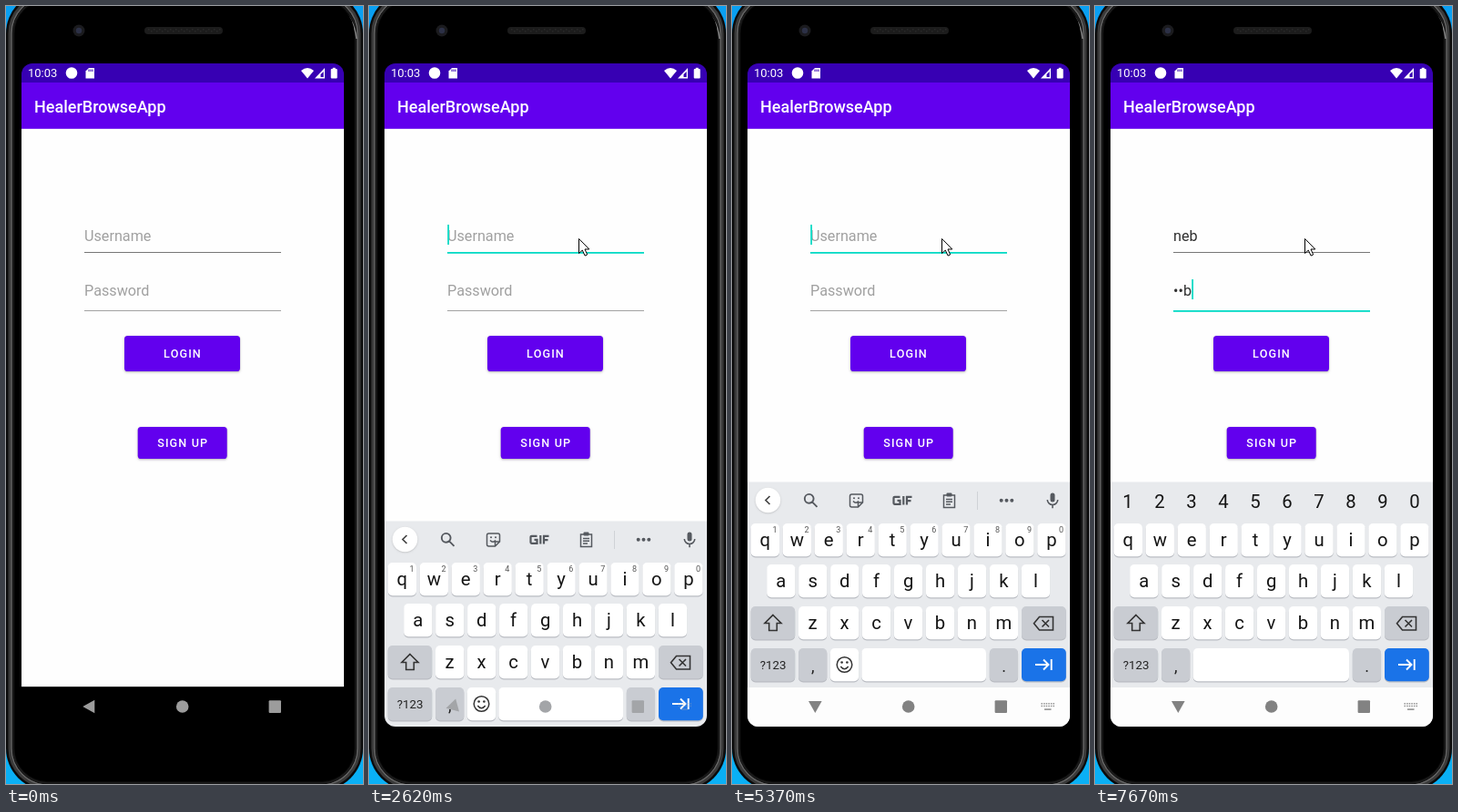
Animation, 392 px wide and 854 px high, one loop 8 s. Source, as an HTML page with a canvas:

```html
<!DOCTYPE html>
<html lang="en">
<head>
<meta charset="utf-8">
<title>Login screen</title>
<style>
html, body { margin: 0; width: 100%; height: 100%; overflow: hidden; background: #0aaef4; }
canvas { display: block; width: 392px; height: 854px; }
</style>
</head>
<body>
<canvas id="stage" width="392" height="854"></canvas>
<script>
const c = document.getElementById('stage').getContext('2d');
const LOOP = 8000;
const USER = 'neb';
const TEAL = '#03dac5', PURPLE = '#6200ee', ICON = '#55595f';
const FONT = 'Roboto, "Open Sans", sans-serif';

// Last entry whose time has passed.
const at = (list, t) => list.reduce((v, [time, value]) => (t >= time ? value : v), null);

const pointerPath = [[1140, [374, 249]], [1290, [276, 271]], [1440, [238, 271]], [1590, [230, 257]], [1740, [230, 255]]];
const caretBlink = [[0, 0], [2180, 1], [2890, 0], [3420, 1], [3950, 0], [4350, 1], [4960, 0], [5370, 1], [7250, 0], [7400, 1]];
const userLen = [[0, 0], [5910, 1], [6180, 2], [6450, 3]];
const markLen = [[0, 0], [6060, 1], [6300, 2], [6600, 3], [6850, 0]];
const passLen = [[0, 0], [7400, 1], [7550, 2], [7670, 3]];
const hints = [[6060, ['n', 'no', 'a']], [6300, ['ne', 'new', 'never']], [6600, ['neb', 'new', 'nebula']]];

function box(x, y, w, h, r, fill) {
  c.beginPath();
  c.roundRect(x, y, w, h, r);
  c.fillStyle = fill;
  c.fill();
}
function rect(x, y, w, h, fill) {
  c.fillStyle = fill;
  c.fillRect(x, y, w, h);
}
function disc(x, y, r, fill) {
  c.beginPath();
  c.arc(x, y, r, 0, 7);
  c.fillStyle = fill;
  c.fill();
}
function poly(pts, fill) {
  c.beginPath();
  pts.forEach(([x, y]) => c.lineTo(x, y));
  c.closePath();
  c.fillStyle = fill;
  c.fill();
}
function stroke(path, color, width = 1.6) {
  c.strokeStyle = color;
  c.lineWidth = width;
  c.stroke(new Path2D(path));
}
function text(s, x, y, size, fill, align = 'left', weight = 400, gap = 0) {
  c.font = `${weight} ${size}px ${FONT}`;
  c.letterSpacing = gap + 'px';
  c.textAlign = align;
  c.fillStyle = fill;
  c.fillText(s, x, y);
  c.letterSpacing = '0px';
}
function shifted(x, y, draw) {
  c.save();
  c.translate(x, y);
  draw();
  c.restore();
}

function frameLine(inset, color, width) {
  c.beginPath();
  c.roundRect(inset, inset - 16, 392 - 2 * inset, 877 - 2 * inset, 46 - inset);
  c.strokeStyle = color;
  c.lineWidth = width;
  c.stroke();
}

function phone() {
  const sky = c.createLinearGradient(0, 0, 0, 854);
  sky.addColorStop(0, '#0a9ff2');
  sky.addColorStop(1, '#0ab0f5');
  rect(0, 0, 392, 854, sky);
  box(0, -16, 392, 877, 46, '#0b0b0b');
  frameLine(4.5, '#3a3a3a', 4);
  frameLine(6, '#666', 1.3);
  frameLine(8, '#1c1c1c', 1.5);
  stroke('M358 -2 Q381 6 385 36', '#858585', 1.5);
  box(9.5, -6, 373, 857, 36, '#000');
  disc(80, 27, 6.5, '#1b1b1e');
  disc(80, 27, 3.2, '#2c3046');
  box(152, 23, 86, 8, 4, '#1c1c1c');
  for (let x = 156; x < 236; x += 3) rect(x, 25 + x % 2 * 2, 1.5, 1.5, '#292929');
}

function statusBar() {
  rect(17, 63, 354, 21.5, '#3700b3');
  text('10:03', 24, 78, 13, '#fff');
  disc(72, 73.5, 6.3, '#fff');
  poly([[91, 68], [97, 68], [97, 79.5], [87.5, 79.5], [87.5, 71.5]], '#fff');
  [90.5, 92.5, 94.5].forEach(x => rect(x, 69.5, 1, 2.5, '#3700b3'));
  c.beginPath();
  c.moveTo(331, 79.5);
  c.lineTo(324, 71);
  c.quadraticCurveTo(331, 65, 338, 71);
  c.fillStyle = '#fff';
  c.fill();
  poly([[350, 68], [350, 79.5], [339, 79.5]], '#fff');
  poly([[348.7, 72], [348.7, 78], [345.5, 78], [345.5, 75]], '#3700b3');
  box(356.7, 69, 7, 10.5, 1, '#fff');
  rect(358.7, 67.8, 3, 2, '#fff');
}

function button(label, x, y, w, h) {
  c.save();
  c.shadowColor = 'rgba(0,0,0,.3)';
  c.shadowBlur = 2.5;
  c.shadowOffsetY = 1;
  box(x, y, w, h, 3.6, PURPLE);
  c.restore();
  text(label, x + w / 2 + 0.5, Math.round(y + h / 2 + 4.6), 12.6, '#fff', 'center', 500, 1.13);
}

function field(value, hint, y, lineY, focused, caret, idle) {
  text(value || hint, 86, y, 16.2, value ? '#303030' : '#a0a0a0');
  const end = 86 + (value ? c.measureText(value).width : 0);
  rect(86, lineY, 216, focused ? 1.8 : 1, focused ? TEAL : idle);
  if (focused && caret) rect(end + 0.2, y - 18, 1.8, 22, TEAL);
}

function app(t) {
  rect(17, 134, 354, 613.4, '#fefefe');
  statusBar();
  rect(17, 84, 354, 50.8, PURPLE);
  text('HealerBrowseApp', 31, 117, 18, '#fff', 'left', 500);
  const caret = at(caretBlink, t);
  const onPass = t >= 6850;
  const name = USER.slice(0, at(userLen, t));
  const n = at(passLen, t);
  const secret = n ? '•'.repeat(n - 1) + USER[n - 1] : '';
  field(name, 'Username', 258, 270, t >= 2180 && !onPass, caret, '#777');
  const marked = at(markLen, t);
  if (marked) rect(86, 260, c.measureText(USER.slice(0, marked)).width, 1, '#555');
  field(secret, 'Password', 318, 334, onPass, caret, '#a2a2a2');
  button('LOGIN', 130, 362, 127, 39);
  button('SIGN UP', 144.7, 462, 98, 35);
}

function key(x, y, w, fill = '#fff') {
  box(x, y + 1, w, 36.5, 5, '#b9bcc2');
  box(x, y, w, 36.3, 5, fill);
}

function letters(row, x0, y, digits) {
  [...row].forEach((ch, i) => {
    const x = x0 + i * 34.95;
    key(x, y, 31.3);
    text(ch, x + 15.6, y + 25, 20.3, '#151515', 'center');
    if (digits) text((i + 1) % 10, x + 26.3, y + 10, 9, '#555', 'center');
  });
}

function mic() {
  box(349.5, 534.5, 5, 10, 2.5, ICON);
  stroke('M346.3 542 a5.7 5.5 0 0 0 11.4 0 M352 547.5 V551.3', ICON);
}

function chevron(open) {
  c.save();
  c.shadowColor = 'rgba(0,0,0,.18)';
  c.shadowBlur = 2;
  c.shadowOffsetY = 0.7;
  disc(39.5, 542.5, 13.8, '#fff');
  c.restore();
  stroke(open ? 'M37.5 538 l4.5 4.5 l-4.5 4.5' : 'M41.5 538 l-4.5 4.5 l4.5 4.5', '#444', 1.7);
}

function tools() {
  chevron(false);
  stroke('M89.6 540.8 a4.9 4.9 0 1 0 -9.8 0 a4.9 4.9 0 1 0 9.8 0 M88 544.3 L93.5 549.8', ICON, 1.9);
  stroke('M131.5 536 h10 a2 2 0 0 1 2 2 v7 l-5 5 h-7 a2 2 0 0 1 -2 -2 v-10 a2 2 0 0 1 2 -2 M143 545 h-4.5 v5 M133 543.5 q3 3.5 6 0', ICON, 1.5);
  disc(134, 540.3, 1, ICON);
  disc(139, 540.3, 1, ICON);
  stroke('M184.5 538.8 h-6 a1 1 0 0 0 -1 1 v6 a1 1 0 0 0 1 1 h6 v-4 h-3 M188.3 538 v9.5 M192 547.5 v-8.7 h5.5 M192 543.2 h4.5', ICON, 2.2);
  stroke('M232.5 537 h12 v13.5 h-12 z M235 541.5 h7 M235 544.3 h7 M235 547 h5', ICON, 1.5);
  box(235.5, 534.5, 6, 4, 1, ICON);
  rect(269, 533, 1, 20, '#cfd2d6');
  [295.7, 301.5, 307.3].forEach(x => disc(x, 542.8, 2, ICON));
  mic();
}

function suggestions(words) {
  chevron(true);
  words.forEach((w, i) => text(w, 96 + i * 96.8, 549, 16.2, '#55585c', 'center'));
  rect(141, 532, 1, 21, '#cfd2d6');
  rect(244, 532, 1, 21, '#cfd2d6');
  mic();
}

function keyboard(t) {
  const secret = t >= 6850, gray = '#c9ccd2';
  rect(17, 522.5, 354, 290, '#e8eaed');
  if (secret) [...'1234567890'].forEach((d, i) => text(d, 36 + i * 35, 551, 20.3, '#151515', 'center'));
  else if (t >= 6060) suggestions(at(hints, t));
  else tools();

  letters('qwertyuiop', 20.7, 568, !secret);
  letters('asdfghjkl', 38.2, 613);
  letters('zxcvbnm', 73, 659);
  key(20.7, 659, 48.5, gray);
  stroke('M45 668.5 l9 9 h-4.7 v8 h-8.6 v-8 h-4.7 z', '#333');
  key(318, 659, 48.8, gray);
  stroke('M337.5 670.5 h15 v14.5 h-15 l-6 -7.2 z M340.5 674 l7.5 7.5 M348 674 l-7.5 7.5', '#333');

  const y = 705;
  key(20.7, y, 48.5, gray);
  text('?123', 45, y + 23, 13.3, '#222', 'center');
  key(73, y, 31.3, gray);
  text(',', 88.7, y + 26, 18, '#222', 'center');
  if (!secret) {
    key(107.8, y, 31.3);
    stroke('M131.8 723 a8.3 8.3 0 1 0 -16.6 0 a8.3 8.3 0 1 0 16.6 0 M119.3 725 q4.2 5.5 8.4 0', '#333', 1.5);
    disc(120.6, 720.5, 1.3, '#333');
    disc(126.4, 720.5, 1.3, '#333');
  }
  const sx = secret ? 107.8 : 142.3;
  key(sx, y, 279 - sx);
  key(282.8, y, 31.3, gray);
  text('.', 298.5, y + 26, 18, '#222', 'center');
  key(318, y, 48.8, '#1a73e8');
  stroke('M333 723 h14 M342 717.5 l5.5 5.5 l-5.5 5.5 M350.7 717 v12', '#fff', 1.9);
}

function navIcons(t, color) {
  const turn = at([[0, 0], [2620, 15], [2770, 86], [2890, 90]], t);
  shifted(91.3, 769, () => {
    c.rotate(-turn * Math.PI / 180);
    poly([[-7, 0], [6, -7.3], [6, 7.3]], color);
  });
  disc(193.7, 769, 6.8, color);
  box(288.6, 762.3, 13.4, 13.6, 1, color);
  if (t < 2470) return;
  c.globalAlpha = t >= 2620 && t < 2770 ? 0.35 : 0.85;
  for (let i = 0; i < 12; i++) rect(339.5 + i % 6 * 2.6, 765 + Math.floor(i / 6) * 2.7, 1.5, 1.5, color);
  rect(343, 771.3, 7.5, 1.6, color);
  c.globalAlpha = 1;
}

function pointer(t) {
  const p = at(pointerPath, t);
  if (!p) return;
  shifted(p[0] + 0.5, p[1] + 0.5, () => {
    const arrow = 'M0 0 V16 L3.8 12.6 L6.6 18.6 L9.2 17.4 L6.5 11.5 H11.3 Z';
    c.fillStyle = '#fff';
    c.fill(new Path2D(arrow));
    stroke(arrow, '#000', 1);
  });
}

function draw(t) {
  phone();
  c.save();
  c.beginPath();
  c.roundRect(17, 63, 354, 728, 12);
  c.clip();
  app(t);
  if (t < 2620) {
    rect(17, 747.4, 354, 44, '#000');
    navIcons(t, '#9c9c9c');
  } else {
    const rising = t < 2770;
    shifted(0, rising ? 43 : 0, () => keyboard(t));
    if (!rising) rect(17, 748, 354, 44, '#fdfdfd');
    navIcons(t, rising ? '#a3a5a8' : '#828282');
  }
  c.restore();
  pointer(t);
}

const start = performance.now();
function tick() {
  draw((performance.now() - start) % LOOP);
  requestAnimationFrame(tick);
}
tick();
</script>
</body>
</html>
```
